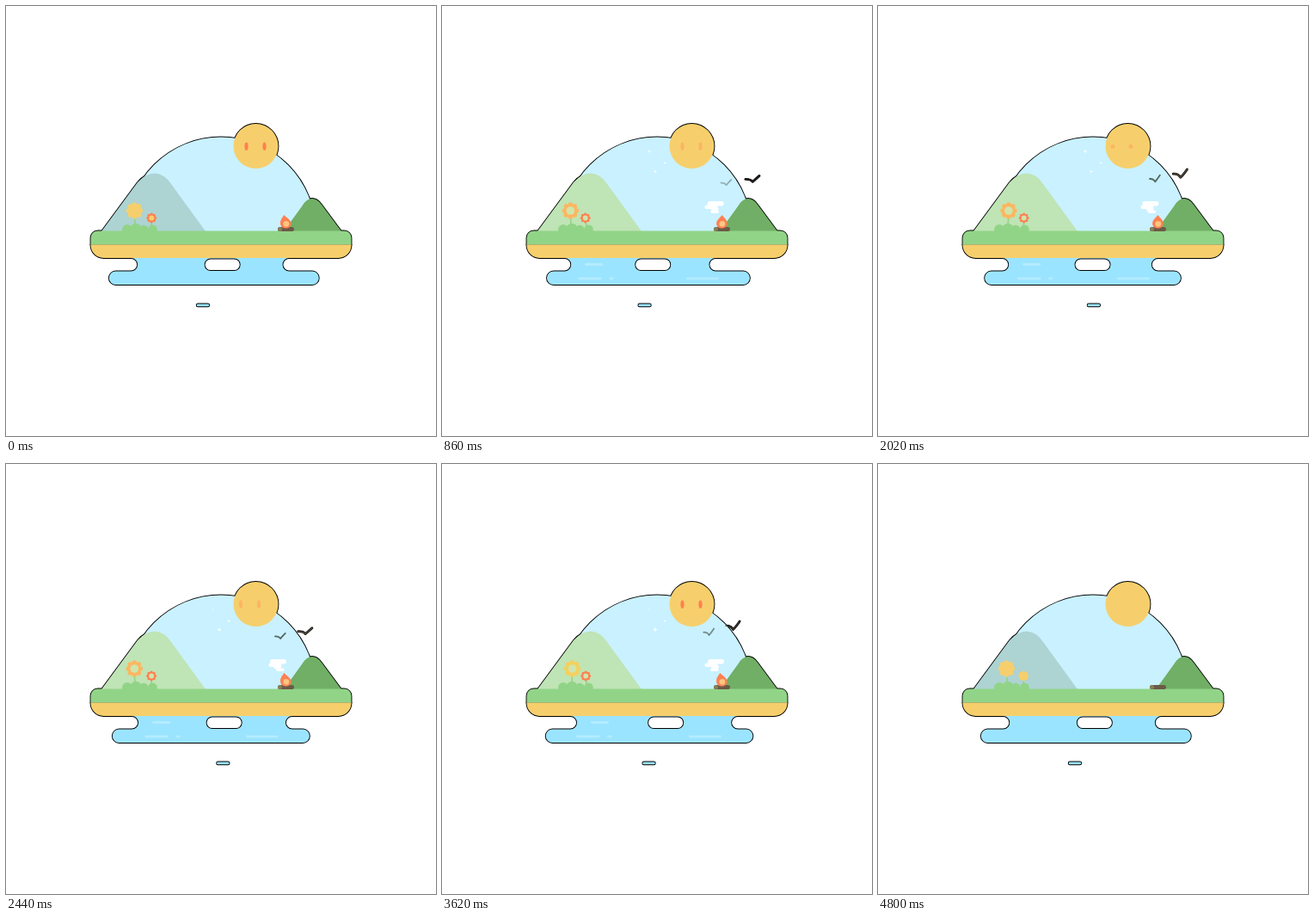
Animation of 500x500 px, one loop 4.82 s. Source, as an HTML page with a canvas:

```html
<!DOCTYPE html>
<html lang="en">
<head>
<meta charset="utf-8">
<title>Little island</title>
<style>
html, body { margin: 0; height: 100%; overflow: hidden; background: #fff; }
canvas { display: block; }
</style>
</head>
<body>
<canvas width="500" height="500"></canvas>
<script>
const LOOP = 4820, TAU = Math.PI * 2, Q = Math.PI / 2;
const ctx = document.querySelector('canvas').getContext('2d');

const sky = '#c9f1ff', waterBlue = '#9be4ff', sunYellow = '#f6cf6c', green = '#91d487', coral = '#ff8052';

// Cosine with `n` cycles per loop, highest at time `peak`.
const wave = (t, peak, n = 1) => Math.cos(TAU * n * (t - peak) / LOOP);
const smooth = (t, a, b) => {
  const u = Math.min(1, Math.max(0, (t - a) / (b - a)));
  return u * u * (3 - 2 * u);
};

function shape(build) {
  const p = new Path2D();
  build(p);
  return p;
}
const circle = (x, y, r) => shape(p => p.arc(x, y, r, 0, TAU));
const box = (x, y, w, h, r) => shape(p => p.roundRect(x, y, w, h, r));

function fill(path, color, rule = 'nonzero') {
  ctx.fillStyle = color;
  ctx.fill(path, rule);
}
function stroke(path, color, width) {
  ctx.strokeStyle = color;
  ctx.lineWidth = width;
  ctx.stroke(path);
}

const dome = shape(p => { p.arc(250, 262.5, 110, Math.PI, 0); p.closePath(); });
const sun = circle(290.5, 163, 26);
const paleHill = new Path2D('M111 262L153 205Q162 194.5 173 194.5Q184 195 192 207L232 262Z');
const darkHill = new Path2D('M323 262L344 233Q349 224 356 224Q362 224 367 231L390 262Z');
const grass = box(98.5, 261.5, 303, 16, [8, 8, 0, 0]);
const sand = box(98.5, 277.5, 303, 15.5, [0, 0, 15, 15]);

function water(end, inlet) {
  const r = 7.75, top = 300.75, low = 316.25;
  return shape(p => {
    p.arc(153.5 + 3.5 * inlet - r, top, r, -Q, Q);
    p.arc(121.8 - 2.3 * end + r, low, r, -Q, Q, true);
    p.arc(358.3 + 6.3 * end - r, low, r, Q, -Q, true);
    p.arc(323 + 13.3 * inlet + r, top, r, Q, -Q);
    p.closePath();
    p.roundRect(231.5 + 7.7 * inlet, 293.5, 42, 14.5, 7.25);
  });
}

function bird(x, y, size, lift) {
  return shape(p => {
    p.moveTo(x - size, y - lift * .5);
    p.quadraticCurveTo(x - size * .3, y - lift * .6, x, y + 2);
    p.quadraticCurveTo(x + size * .4, y - 1, x + size * .9, y - 3 - lift);
  });
}

function star(x, y, r) {
  fill(shape(p => {
    for (let i = 0; i < 8; i++) {
      const d = i % 2 ? r * .3 : r;
      p.lineTo(x + d * Math.cos(i * Q / 2), y + d * Math.sin(i * Q / 2));
    }
  }), '#fff');
}

function flower(x, y, r, rootX, petal, heart) {
  stroke(shape(p => { p.moveTo(x, y + r * .6); p.quadraticCurveTo(x, y + r, rootX, 258); }), green, 1.6);
  for (let i = 0; i < 8; i++) {
    const a = i * Q / 2;
    fill(circle(x + r * .72 * Math.cos(a), y + r * .72 * Math.sin(a), r * .29), petal);
  }
  fill(circle(x, y, r * .78), petal);
  fill(circle(x, y, r * .5), heart);
}

function eyes(t, color) {
  const look = smooth(t, 1300, 1550) - smooth(t, 3150, 3400);
  const blink = Math.max(0, 1 - Math.abs(t - 2020) / 160);
  for (const x of [279.5, 300.5])
    fill(shape(p => p.ellipse(x - 6.5 * look, 163.3, 2.1 + .4 * blink, 4.7 - 2.2 * blink, 0, 0, TAU)), color);
}

function fire(t) {
  const tip = 324.6 - 1.2 * wave(t, 0, 8);
  fill(shape(p => {
    p.moveTo(tip, 243);
    p.bezierCurveTo(tip + 2, 246, 332, 248, 331.5, 254);
    p.bezierCurveTo(331, 260, 320, 260, 319.2, 254);
    p.bezierCurveTo(318.5, 249, tip - 3, 247, tip, 243);
  }), coral);
  fill(circle(325.8, 253.3, 3.4), '#ffc580');
}

function cloud(drift) {
  fill(box(308 + drift, 227, 19, 5.5, 2.7), '#fff');
  fill(box(305.5, 231.5, 15, 4.5, 2), '#fff');
  fill(box(312 + drift, 234, 9, 4, 2), '#fff');
  fill(box(313 - drift, 237.5, 9.5, 3.5, 1.7), '#fff');
}

function draw(t) {
  const start = t < 100, finish = t > 4720, plain = start || finish;
  const end = wave(t, 4430), inlet = wave(t, 3530);
  const pool = water(end, inlet);
  const drop = box(233.4 - 11.7 * wave(t, 0), 346.5, 14.5, 2.8, 1.4);
  const lift = 3 + 1.5 * wave(t, 360, 6);
  const birdAlpha = Math.max(0, Math.min(1, t / 1900, (4500 - t) / 1200));
  const nearBird = bird(368.5 - .0083 * t, 206 - .0043 * t, 8.5, lift);
  const farBird = bird(337 - .0073 * t, 209 - .0033 * t, 6.2, lift * .6);

  ctx.fillStyle = '#fff';
  ctx.fillRect(0, 0, 500, 500);

  // Black silhouette first; the fills leave only its thin outer rim.
  for (const p of [dome, sun, paleHill, darkHill, grass, sand, pool, drop]) stroke(p, '#000', 1.8);
  if (birdAlpha > .1) stroke(nearBird, '#000', 2.8);

  fill(dome, sky);
  fill(sun, sunYellow);
  const strong = start || (t > 3300 && t < 3850);
  if (!finish) eyes(t, strong ? coral : '#fdb562');

  if (!plain) {
    const twinkle = wave(t, 2910, 4);
    star(241, 169, 3 + 2 * twinkle);
    star(259, 182.5, 2);
    star(248, 192.5, 2.2 - 1.2 * twinkle);
    cloud(wave(t, 3620, 2));
  }

  fill(paleHill, plain ? '#add3d3' : '#bfe4b5');
  fill(darkHill, '#70af65');

  ctx.globalAlpha = birdAlpha;
  stroke(farBird, '#53675f', 1.8);
  stroke(nearBird, '#51483d', 1.5);
  ctx.globalAlpha = 1;

  const petal = plain ? sunYellow : strong ? '#f6cf5c' : '#fdb660';
  const heart = plain ? sunYellow : '#d0e5ad';
  flower(150.5 + 2.5 * wave(t, 1640, 2), 238, 9.6, 150.5, petal, heart);
  flower(168.2 + 1.5 * wave(t, 2090, 2), 246.5, 5.9, 169, finish ? sunYellow : coral, heart);
  for (const [x, y, r] of [[141, 260, 6], [151, 259, 6.2], [160, 260.5, 5.8], [170.5, 259.8, 5.3]])
    fill(circle(x, y, r), green);

  fill(grass, green);
  fill(sand, sunYellow);
  fill(box(98.5, 277, 303, .8, 0), '#b7b879');
  fill(box(316, 257, 19, 5, 2.5), '#6b5a47');
  fill(box(316, 257, 5, 5, 2.5), '#84805a');
  if (!finish) fire(t);

  fill(pool, waterBlue, 'evenodd');
  fill(drop, waterBlue);
  if (!plain) {
    const ripple = (x, y, w) => fill(box(x, y - 1.4, w, 2.8, 1.4), '#b4ecff');
    ripple(169.5 + 3.5 * inlet, 300.5, 21);
    ripple(158 - 4 * end, 316.8, 27.5);
    ripple(194 - 4 * end, 316.8, 5.5);
    ripple(284 + 6 * end, 316.8, 38);
  }
}

ctx.lineCap = ctx.lineJoin = 'round';
const begin = performance.now();
function tick() {
  draw((performance.now() - begin) % LOOP);
  requestAnimationFrame(tick);
}
tick();
</script>
</body>
</html>
```
